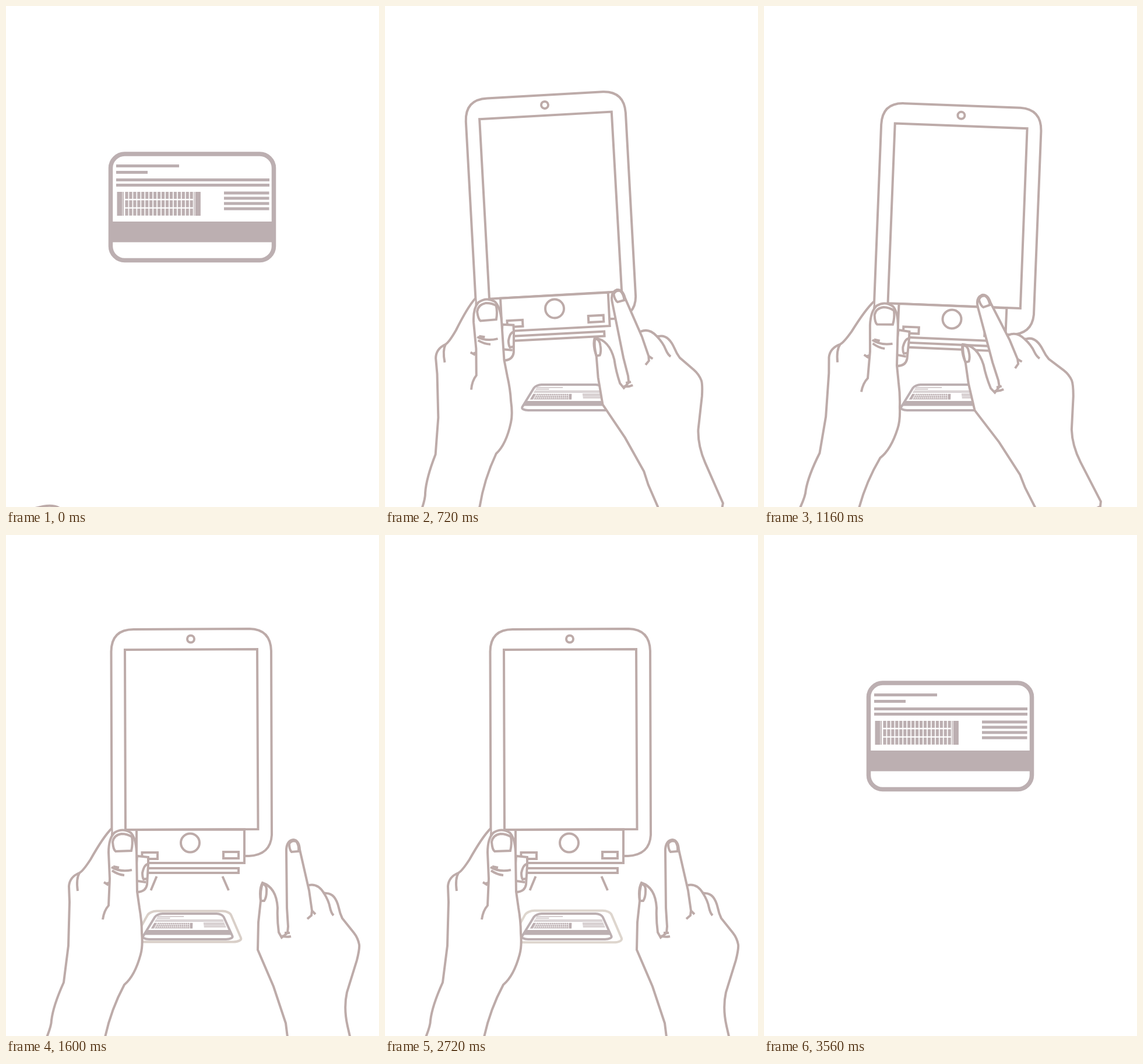
An HTML page with a canvas for the animation above (3840 ms loop, 640 px wide and 860 px high).

```html
<!DOCTYPE html>
<html lang="en">
<head>
<meta charset="utf-8">
<title>Scanning a card</title>
<style>
  html, body { margin: 0; height: 100%; overflow: hidden; background: #fff; }
  canvas { display: block; }
</style>
</head>
<body>
<canvas id="stage" width="640" height="860"></canvas>
<script>
const ctx = document.getElementById('stage').getContext('2d');
const LOOP = 3840, STEP = 40;
const LINE = '#bdaba9', CARD = '#bcafb1';

const lerp = (a, b, u) => a + (b - a) * u;
const clamp = u => Math.max(0, Math.min(1, u));
const smooth = u => u * u * (3 - 2 * u);
const easeOut = u => 1 - (1 - u) ** 2.5;
const easeIn = u => u ** 3.5;

// Keys: time, x, y, angle in degrees, easing towards this key
const deviceKeys = [
  [40, 41, 1239, -12],
  [680, 291, 519, -2.95, easeOut],
  [740, 291, 519, -2.95],
  [1160, 322.5, 537, 2.45],
  [1440, 316, 528, 0],
  [2800, 316, 528, 0],
  [3360, -166, 705, -20, easeIn]
];
const rightKeys = [
  [260, 790, 690, 0],
  [700, 398, 487, -10.8, u => 1 - (1 - u) ** 1.3],
  [740, 398, 487, -10.8],
  [1160, 374, 496, -14.3],
  [1440, 493, 523, 0],
  [2800, 493, 523, 0],
  [3360, 777, 665, 0, easeIn]
];

function poseAt(keys, t) {
  const i = keys.findIndex(k => k[0] > t);
  if (i === 0) return keys[0].slice(1, 4);
  if (i < 0) return keys[keys.length - 1].slice(1, 4);
  const a = keys[i - 1], b = keys[i];
  const u = (b[4] || smooth)((t - a[0]) / (b[0] - a[0]));
  return [1, 2, 3].map(n => lerp(a[n], b[n], u));
}

// Runs draw with the resting pivot carried to the pose
function posed(pivotX, pivotY, [x, y, angle], draw) {
  ctx.save();
  ctx.translate(x, y);
  ctx.rotate(angle * Math.PI / 180);
  ctx.translate(-pivotX, -pivotY);
  draw();
  ctx.restore();
}

const path = d => new Path2D(d);
function shape(p, fill = true) {
  if (fill) ctx.fill(p);
  ctx.stroke(p);
}

const device = [
  'M181.5 512 L180.5 200 Q181 162 219 162 L418 161 Q454 162 455 199 L456 515 Q454 549 417 551 L215 551 Q183 549 181.5 512 Z',
  'M204 197 L431 196 L432.5 505 L205 506 Z',
  'M224 506 L409 505.5 V563 H224 Z',
  'M233.500 545 H260 V556 H233.500 Z M373 544 H399 V555 H373 Z',
  'M230 572 H399 V580 H230 Z',
  'M332 528.500 A16 16 0 1 1 300 528.500 A16 16 0 1 1 332 528.500 Z',
  'M323 178.500 A6 6 0 1 1 311 178.500 A6 6 0 1 1 323 178.500 Z'
].map(path);

const leftBackFinger = path('M225 551 L244 553 V566 L242 600 Q240 612 226 613 L220 612 Z');
const leftBackMarks = path('M243 565 Q237 566 234 580 Q234 588 236 591 L242 590 M226 594 L240 596');
const leftHand = path('M181 504 Q167 518 145 557 Q132 577 126 580 Q109 587 108 603 L109 630 L107 705 L99 768 ' +
  'Q81 808 78 833 Q78 842 70 862 L50 930 L150 930 L170 862 Q180 815 203 772 Q221 757 231 720 Q235 706 233 683 ' +
  'Q233 663 229 640 L225 612 L224 545 Q223 520 214 511 Q200 502 186 511 Q176 521 176 545 L178 590 L176 636 Q168 645 166 660');
const leftMarks = path('M183 527 Q184 540 188 543 L215 542 Q218 530 216 518 Q208 513 198 513 Q185 515 183 527 Z ' +
  'M126 580 Q120 590 123 611 M168 596 L176 601 M171 599 L177 597 ' +
  'M184 569 L194 571 M181 570 Q195 579 216 575 M182 576 Q192 583 203 584');

const rightHand = path('M517 659 L524 653 L525 645 L520 610 L504 540 Q503 524 493 523 Q480 525 481 545 L482 640 L484 672 L483 683 ' +
  'L473 691 L468 682 Q465 660 466 640 Q464 605 440 597 Q434 608 437 628 L433 665 L432 712 L459 775 L480 838 L483 862 L492 902 L495 945 ' +
  'L600 925 L603 917 L586 843 Q579 812 585 785 L602 730 Q607 710 606 703 Q604 692 597 683 L577 658 ' +
  'Q573 650 571 640 Q565 614 548 615 L545 614 Q535 598 520 601');
const rightMarks = path('M486 530 Q486 540 490 544 L502 543 Q503 532 498 526 Q490 523 486 530 Z ' +
  'M437 628 Q436 610 440 599 Q448 600 447 612 Q447 622 443 628 Z ' +
  'M545 614 Q554 628 556 640 Q558 649 562 653 M525 645 L531 651 M478 683 L487 683 M473 688 Q480 691 489 689');

// Card quads: top y, bottom y, top left, top right, bottom left, bottom right
const FLAT = [254, 436.5, 179.5, 459.5, 179.5, 459.5];
const TABLE = [650, 694, 259, 371, 232, 391];

// Places a point of the flat card on a quad
function place(q, x, y) {
  const u = (x - 179.5) / 280, v = (y - 254) / 182.5;
  return [lerp(lerp(q[2], q[4], v), lerp(q[3], q[5], v), u), lerp(q[0], q[1], v)];
}

function cardOutline(q) {
  const [l, t, r, b] = [179.5, 254, 459.5, 436.5], R = 24, k = 11;
  const at = (x, y) => place(q, x, y);
  const corner = (x, y, inX, inY, outX, outY) => {
    ctx.lineTo(...at(x + inX * R, y + inY * R));
    ctx.bezierCurveTo(...at(x + inX * k, y + inY * k), ...at(x + outX * k, y + outY * k),
      ...at(x + outX * R, y + outY * R));
  };
  ctx.beginPath();
  corner(l, t, 0, 1, 1, 0);
  corner(r, t, -1, 0, 0, 1);
  corner(r, b, 0, -1, -1, 0);
  corner(l, b, 1, 0, 0, -1);
  ctx.closePath();
}

const bars = [
  [189, 272, 108, 5], [189, 283, 54, 5], [189, 296, 263, 5], [189, 305, 263, 5],
  [190.5, 319, 9, 41], [200.3, 319, 1.7, 41], [322.3, 319, 1.4, 41], [324.7, 319, 9.2, 41],
  [179.5, 370, 280, 35.5]
];
for (let i = 0; i < 4; i++) bars.push([374, 318.5 + i * 9, 77.5, 5]);
for (let row = 0; row < 3; row++)
  for (let col = 0; col < 17; col++)
    bars.push([204.4 + col * 6.95, 319 + row * 14.4, 5.2, 12]);

function drawCard(e) {
  const q = FLAT.map((v, i) => lerp(v, TABLE[i], e));
  cardOutline(q);
  ctx.fillStyle = '#fff';
  ctx.fill();
  ctx.strokeStyle = CARD;
  ctx.lineWidth = lerp(7.5, 4, e);
  ctx.stroke();
  ctx.fillStyle = CARD;
  ctx.beginPath();
  for (const [x, y, w, h] of bars) {
    ctx.moveTo(...place(q, x, y));
    ctx.lineTo(...place(q, x + w, y));
    ctx.lineTo(...place(q, x + w, y + h));
    ctx.lineTo(...place(q, x, y + h));
    ctx.closePath();
  }
  ctx.fill();
}

function drawPulse(t) {
  if (t < 1400 || t >= 3200) return;
  const p = (t - 1400) % 360 / 360;
  const grow = [-8, 8, -22, 22, -27, 27];
  cardOutline(TABLE.map((v, i) => v + grow[i] * p));
  ctx.lineWidth = 4;
  ctx.strokeStyle = `rgb(${lerp(189, 239, p)},${lerp(171, 235, p)},${lerp(169, 225, p)})`;
  ctx.stroke();
  if (p >= 0.5 && t < 2800) {
    ctx.strokeStyle = LINE;
    ctx.stroke(path('M258.500 586 L248.500 610 M371.500 586 L382 610'));
  }
}

function drawLeft() {
  device.forEach(p => shape(p));
  shape(leftBackFinger);
  shape(leftBackMarks, false);
  shape(leftHand);
  shape(leftMarks, false);
}

function drawRight() {
  shape(rightHand);
  shape(rightMarks, false);
}

function render(t) {
  ctx.fillStyle = '#fff';
  ctx.fillRect(0, 0, 640, 860);
  drawPulse(t);
  drawCard(t < 3360 ? smooth(clamp(t / 280)) : 1 - clamp((t - 3360) / 200));
  ctx.fillStyle = '#fff';
  ctx.strokeStyle = LINE;
  ctx.lineWidth = 4;
  posed(316, 528, poseAt(deviceKeys, t), drawLeft);
  posed(493, 523, poseAt(rightKeys, t), drawRight);
}

const start = performance.now();
function tick() {
  const t = (performance.now() - start) % LOOP;
  render(Math.floor(t / STEP) * STEP);
  requestAnimationFrame(tick);
}
tick();
</script>
</body>
</html>
```
